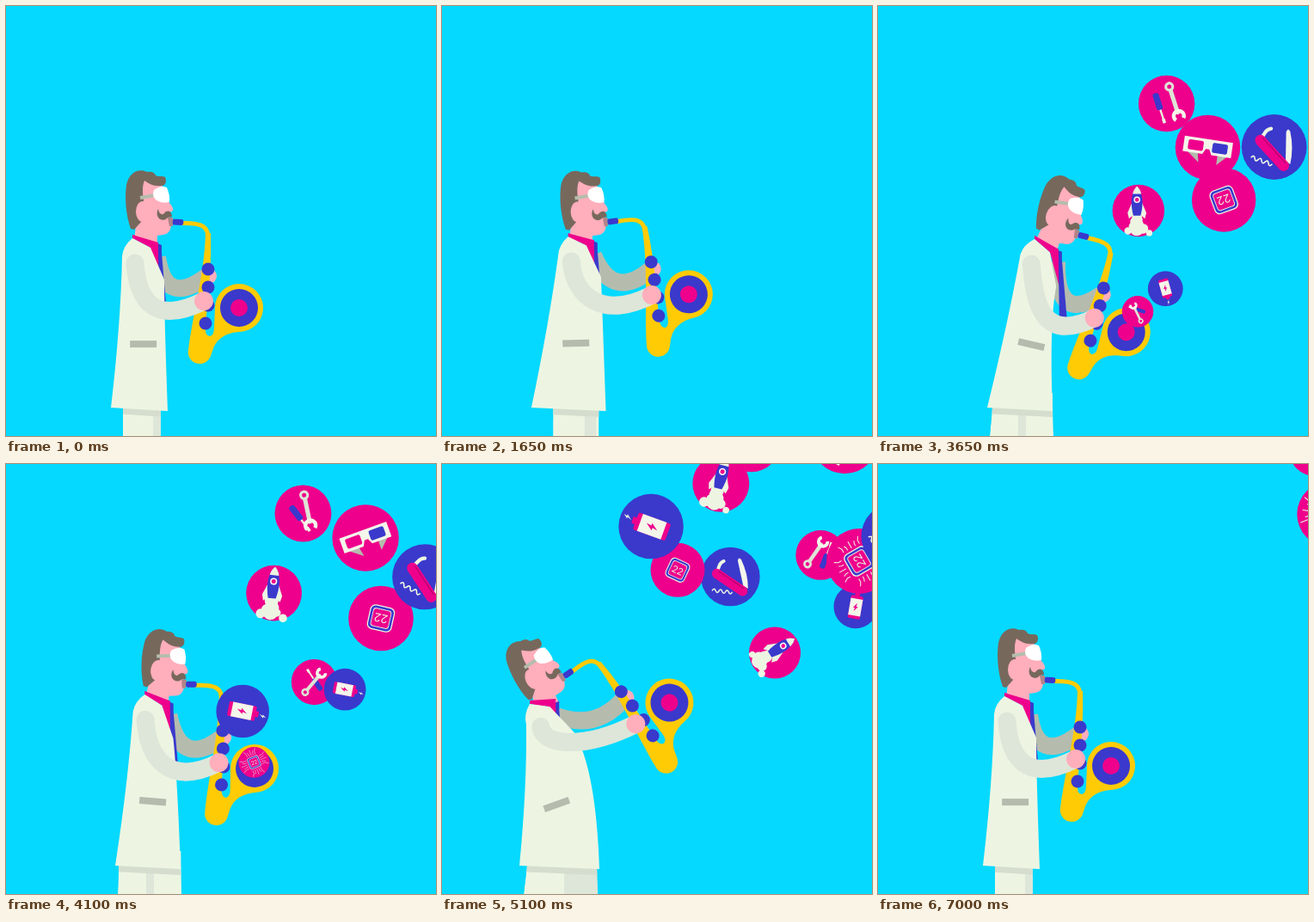
Animation, 500 px wide and 500 px high, one loop 7.05 s. Source, as an HTML page with a canvas:

```html
<!DOCTYPE html>
<html lang="en">
<head>
<meta charset="utf-8">
<title>Saxophone player</title>
<style>
html, body { margin: 0; width: 100%; height: 100%; overflow: hidden; background: #05d9ff; }
canvas { display: block; }
</style>
</head>
<body>
<canvas id="stage" width="500" height="500"></canvas>
<script>
const ctx = document.getElementById('stage').getContext('2d');
const LOOP = 7050, STEP = 50, RAD = Math.PI / 180;
const SKY = '#05d9ff', COAT = '#edf5e2', SLEEVE = '#dde6d9', GREY = '#b5bcae', HAIR = '#77685c',
  SKIN = '#ffaebb', PINK = '#ee008c', BLUE = '#3a39cc', GOLD = '#ffcb05', WHITE = '#fff';

// Rig settings: joint places in pixels, joint turns in degrees
const upright = { mouthX: 194, mouthY: 251, neckX: 147, neckY: 270, sax: 0, head: 0, chest: 0,
  hemL: 122, hemR: 188, legL: 136, legR: 180, split: 171 };
const back = { mouthX: 142, mouthY: 247, neckX: 102, neckY: 279, sax: -38.4, head: -24, chest: -20,
  hemL: 90, hemR: 183, legL: 95, legR: 181, split: 142 };
const forward = { mouthX: 233, mouthY: 266, neckX: 182, neckY: 271, sax: 11.4, head: 18, chest: 13,
  hemL: 127, hemR: 203, legL: 130, legR: 204, split: 163 };

const mix = (a, b, k) => a + (b - a) * k;
const lerp = (p, q, k) => [mix(p[0], q[0], k), mix(p[1], q[1], k)];
const add = (p, x, y) => [p[0] + x, p[1] + y];
function ease(t, from, to) {
  const k = Math.min(1, Math.max(0, (t - from) / (to - from)));
  return k * k * (3 - 2 * k);
}
function turned(x, y, deg) {
  const c = Math.cos(deg * RAD), s = Math.sin(deg * RAD);
  return [x * c - y * s, x * s + y * c];
}

// The player leans back, sways forward and back again, then stands up; the coat hem trails behind
function poseAt(t) {
  const play = ease(t, 0, 850) - ease(t, 5300, 6900);
  const sway = ease(t, 950, 2250) - ease(t, 3750, 4800);
  const trail = ease(t, 1150, 2350) - ease(t, 4300, 5050);
  const stride = Math.abs(2 * trail - 1);
  const pose = {};
  for (const key in upright) {
    const lower = /hem|leg|split/.test(key), feet = /leg|split/.test(key);
    const swung = mix(back[key], forward[key], lower ? trail : sway);
    pose[key] = mix(upright[key], swung, feet ? play * stride : play);
  }
  const lift = 26 * sway * (1 - sway) * play;
  pose.mouthY -= lift;
  pose.neckY -= lift;
  pose.darkLeg = 9 + 30 * play * (1 - trail) * stride;
  return pose;
}
const onSax = (p, x, y) => add(turned(x, y, p.sax), p.mouthX, p.mouthY);
const onChest = (p, x, y) => add(turned(x, y, p.chest), p.neckX, p.neckY);

function fill(color, d) {
  ctx.fillStyle = color;
  ctx.fill(typeof d === 'string' ? new Path2D(d) : d);
}
function line(color, width, d, cap = 'round') {
  ctx.strokeStyle = color;
  ctx.lineWidth = width;
  ctx.lineCap = cap;
  ctx.lineJoin = 'round';
  ctx.stroke(new Path2D(d));
}
function disc(color, x, y, r) {
  ctx.fillStyle = color;
  ctx.beginPath();
  ctx.arc(x, y, r, 0, 7);
  ctx.fill();
}
function box(color, x, y, w, h, r = 0) {
  ctx.fillStyle = color;
  ctx.beginPath();
  ctx.roundRect(x, y, w, h, r);
  ctx.fill();
}
function placed(x, y, deg, scale, draw) {
  ctx.save();
  ctx.translate(x, y);
  ctx.rotate(deg * RAD);
  ctx.scale(scale, scale);
  draw();
  ctx.restore();
}

function drawHead() {
  ctx.translate(-194, -251);
  fill(SKIN, 'M158 202 L180 207 C186 214 189 222 190 229 C193 232 196 237 193 239 L189 240 L191 248 C194 258 190 265 183 266 L176 267 L176 275 L149 272 L151 255 Z');
  fill(HAIR, 'M149 260 L145 259 C139 242 138 222 140 208 C143 193 155 188 164 193 C170 192 173 194 174 197 C178 199 182 197 185 199 C187 203 186 209 181 209 C172 210 167 207 161 203 C158 210 159 218 160 226 L158 250 Z');
  ctx.fillStyle = SKIN;
  ctx.beginPath();
  ctx.ellipse(159, 239, 8, 12, 0, 0, 7);
  ctx.fill();
  line(GREY, 4, 'M156 223 L173 220', 'butt');
  fill(WHITE, 'M172 214 Q180 208 187 211 Q191 220 190 228 Q181 230 175 226 Q169 221 172 214 Z');
  fill('#b18488', 'M188 246 H194 V256 H190 Z');
  fill(HAIR, 'M177 236 C172 246 182 253 188 246 L193 245 C193 238 187 236 183 242 C180 243 178 241 177 236 Z');
}

function drawSax() {
  ctx.translate(-194, -251);
  line(GOLD, 5, 'M204 252.5 C228 252 236 256 235 272', 'butt');
  fill(GOLD, 'M232 264 L238 264 C239 300 236 330 232 372 Q231 384 237 384 Q242 383 242 374 L243 351 L271 379 C256 380 246 386 241 398 L238 407 A13.5 13.5 0 0 1 212 400 C217 360 231 310 232 264 Z');
  disc(GOLD, 271, 351, 28);
  disc(BLUE, 271, 351, 22);
  disc(PINK, 271, 351, 10);
  placed(194, 247.5, 3, 1, () => box(BLUE, 0, 0, 12.5, 7, 2.5));
  for (let i = 0; i < 4; i++) disc(BLUE, 235 - (i === 3 ? 3 : 0), 306 + i * 21, 7.5);
}

function drawLegs(p, coat) {
  const { legL, legR, split, darkLeg } = p;
  const slope = Math.abs(p.head) / 4;
  const legs = new Path2D(`M${legL + slope} 450 L${legR - slope / 4} 450 L${legR} 500 L${legL} 500 Z`);
  ctx.save();
  ctx.clip(legs);
  fill(COAT, legs);
  box(SLEEVE, split, 450, darkLeg, 50);
  ctx.translate(0, 7);
  fill('#d5ddce', coat);
  ctx.restore();
}

function drawPlayer(p) {
  const neck = [p.neckX, p.neckY];
  const lapel = onChest(p, 21, 11), chest = onChest(p, 37, 48), tie = onChest(p, 31, 6);
  const nape = onChest(p, -11, 9), blade = onChest(p, -12, 21), shoulder = onChest(p, 3, 29);
  const hemL = [p.hemL, 467], hemR = [p.hemR, 471];
  const waist = add(lerp(blade, hemL, .5), 5, -10), belly = [p.hemR - 4, chest[1] + 42];
  const far = onSax(p, 40, 63), near = onSax(p, 36 + .13 * p.sax, 92 - .08 * p.sax);
  const elbow = add(near, -58, 29);
  const upperArm = add(shoulder, 3, 25 + .4 * (near[1] - shoulder[1]));
  const coat = new Path2D(`M${neck} L${lapel} L${chest} Q${belly} ${hemR} L${hemL} Q${waist} ${blade} Q${nape} ${neck} Z`);

  drawLegs(p, coat);
  line(GREY, 20, `M${add(lapel, 8, 11)} Q${add(elbow, 13, -21)} ${far}`, 'butt');
  disc(SKIN, far[0] + 2, far[1], 9);
  fill(PINK, `M${add(neck, 0, -4)} L${add(tie, -1, -1)} L${add(tie, 2, 50)} L${lapel} Z`);
  const [x, y] = tie;
  fill(BLUE, `M${x - 2} ${y} L${x + 3} ${y + 2} L${x + 3} ${y + 11} L${x + 9} ${y + 82} H${x} L${x - 1} ${y + 11} Z`);
  placed(p.mouthX, p.mouthY, p.head, 1, drawHead);
  fill(PINK, `M${add(neck, 0, -4)} L${add(tie, -1, -1)} L${add(tie, -1, 15)} L${lapel} L${neck} Z`);
  fill(COAT, coat);
  const pocket = add(lerp(shoulder, lerp(hemL, hemR, .5), .53), 7, 4);
  placed(...pocket, p.chest, 1, () => box(GREY, -15.5, -4, 31, 8));
  placed(p.mouthX, p.mouthY, p.sax, 1, drawSax);
  line(SLEEVE, 21, `M${shoulder} C${upperArm} ${elbow} ${near}`, 'butt');
  disc(SLEEVE, ...shoulder, 10.5);
  disc(SKIN, ...near, 11);
}

// Icons are drawn for a bubble of radius 36
const icons = {
  tools(age) {
    const open = (40 + 40 * Math.cos((age - 450) * Math.PI / 800)) * Math.min(1, Math.exp((450 - age) / 2000));
    const apart = Math.max(.2, 1 - open / 80);
    placed(-10 * apart, 3, 0, 1, () => {
      line(COAT, 2.5, 'M0 0 V18');
      box(COAT, -2, 14, 4, 6, 1);
      box(BLUE, -4, -20, 8, 22, 3);
    });
    placed(10 * apart, 0, open, 1, () => {
      line('#dfe3d6', 5.5, 'M0 -14 V15');
      line('#dfe3d6', 3.5, 'M0 -24 A4.5 4.5 0 1 1 -.1 -24');
      line('#f4f6ea', 5, 'M-5 24 A6.5 6.5 0 1 1 5 24', 'butt');
    });
  },
  knife() {
    line(COAT, 4, 'M-17 -3 L-15 -11 Q-14 -16 -10 -18');
    fill('#f4f6ea', 'M17 10 L7 -20 Q7 -26 11 -22 Q21 -6 23 12 Z');
    placed(0, 7, 28, 1, () => {
      box(PINK, -25, -6, 50, 12, 6);
      line('#b0006c', 1, 'M-19 -3.5 H18');
    });
    line(COAT, 1.6, 'M-20 19 q2 -4 4 0 t4 0 t4 0 t4 0 t4 0 t4 0');
  },
  chip(age) {
    const reach = Math.min(1, Math.max(0, 1.5 * Math.cos(age * Math.PI / 1000) + .2));
    for (let i = 0; reach && i < 20; i++) placed(0, 0, Math.floor(i / 5) * 90, 1, () => {
      const k = i % 5 - 2, len = (k % 2 ? 9 : 13) * reach;
      line(COAT, 1, `M${k * 5} -17 v${-len / 2} l${k * 2 * reach} ${-len / 2}`);
    });
    box(COAT, -14, -14, 28, 28, 6);
    box(BLUE, -12.8, -12.8, 25.6, 25.6, 5);
    box(COAT, -10.4, -10.4, 20.8, 20.8, 3.5);
    box(PINK, -9.6, -9.6, 19.2, 19.2, 3);
    ctx.fillStyle = COAT;
    ctx.font = '13px Lato, sans-serif';
    ctx.textAlign = 'center';
    ctx.textBaseline = 'middle';
    ctx.fillText('22', 0, 1);
  },
  glasses() {
    fill(GREY, 'M-26 4 L-8 18 L-10 8 Z M26 4 L12 18 L12 8 Z');
    fill('#f4f6ea', 'M-27 -9 H27 V8 H5 L2 2 H-2 L-5 8 H-27 Z');
    box(PINK, -22, -6, 17, 11, 2);
    box(BLUE, 5, -6, 17, 11, 2);
  },
  rocket(age) {
    for (let i = 0; i < 8; i++) {
      const low = i / 7, puff = Math.sin(age / 130 + i * 2);
      disc(COAT, -2 + (i % 2 ? 1 : -1) * 17 * low * low, 10 + 21 * low, 8 - 3 * low + puff);
    }
    disc(COAT, -2, 25, 10);
    fill(COAT, 'M-9 -11 L-15 3 L-13 11 L-6 5 Z M5 -11 L11 3 L9 11 L2 5 Z');
    fill(BLUE, 'M-2 -34 C7 -24 7 -8 3 7 H-7 C-11 -8 -11 -24 -2 -34 Z');
    fill(COAT, 'M-2 -34 Q3 -29 4 -23 H-8 Q-7 -29 -2 -34 Z');
    disc(WHITE, -2, -15, 4.5);
    disc(PINK, -2, -15, 2.8);
  },
  battery() {
    box(PINK, -4, -22, 8, 5, 1);
    box(PINK, -10, -18, 20, 38, 2);
    box('#f4f6ea', -10, -13, 20, 28);
    fill(PINK, 'M2 -6 L-4 2 H-1 L-2 8 L4 0 H1 Z');
    fill(COAT, 'M3 -33 L-1 -28 H1 L-1 -23 L4 -29 H2 Z');
  }
};

// kind, radius, birth, heading from straight up, reach, first turn, spin
const bubbles = [
  ['knife', 38, 2106, 39, 449, -40, 98],
  ['tools', 33, 2400, 10, 508, 75, -175],
  ['chip', 38, 2680, 36.4, 430, 50, 247],
  ['glasses', 39, 2820, 23.8, 594, 86, -196],
  ['rocket', 33, 3114, 5.7, 512, -10, 36],
  ['battery', 25.5, 3375, 42, 443, 212, -312],
  ['tools', 29, 3560, 29, 515, 99, 169],
  ['battery', 38, 3810, -8.5, 570, 174, -450],
  ['chip', 32, 4060, -3.7, 505, -25, 107],
  ['knife', 36, 4385, 16.5, 540, -16, 63],
  ['rocket', 32, 4470, 53.3, 432, 20, 120]
].reverse();

// Each bubble leaves the bell in a straight line, slowing down, with its spin slowing alike
function drawBubbles(t) {
  for (const [kind, size, birth, heading, reach, turn, spin] of bubbles) {
    const age = t - birth;
    if (age < 0) continue;
    const gone = 1 - Math.exp(-age / 1650);
    const bell = onSax(poseAt(birth), 77, 100);
    const [x, y] = add(turned(0, -reach * gone, heading), ...bell);
    const r = size * (1 - .5 * Math.exp(-age / 300));
    if (x - r > 510 || y + r < -10) continue;
    disc(kind === 'knife' || kind === 'battery' ? BLUE : PINK, x, y, r);
    placed(x, y, turn + spin * gone, r / 36, () => icons[kind](age));
  }
}

function render(now) {
  const t = Math.floor(now % LOOP / STEP) * STEP;
  ctx.fillStyle = SKY;
  ctx.fillRect(0, 0, 500, 500);
  drawPlayer(poseAt(t));
  drawBubbles(t);
}

let begin;
function tick(now) {
  begin ??= now;
  render(now - begin);
  requestAnimationFrame(tick);
}
render(0);
requestAnimationFrame(tick);
</script>
</body>
</html>
```
